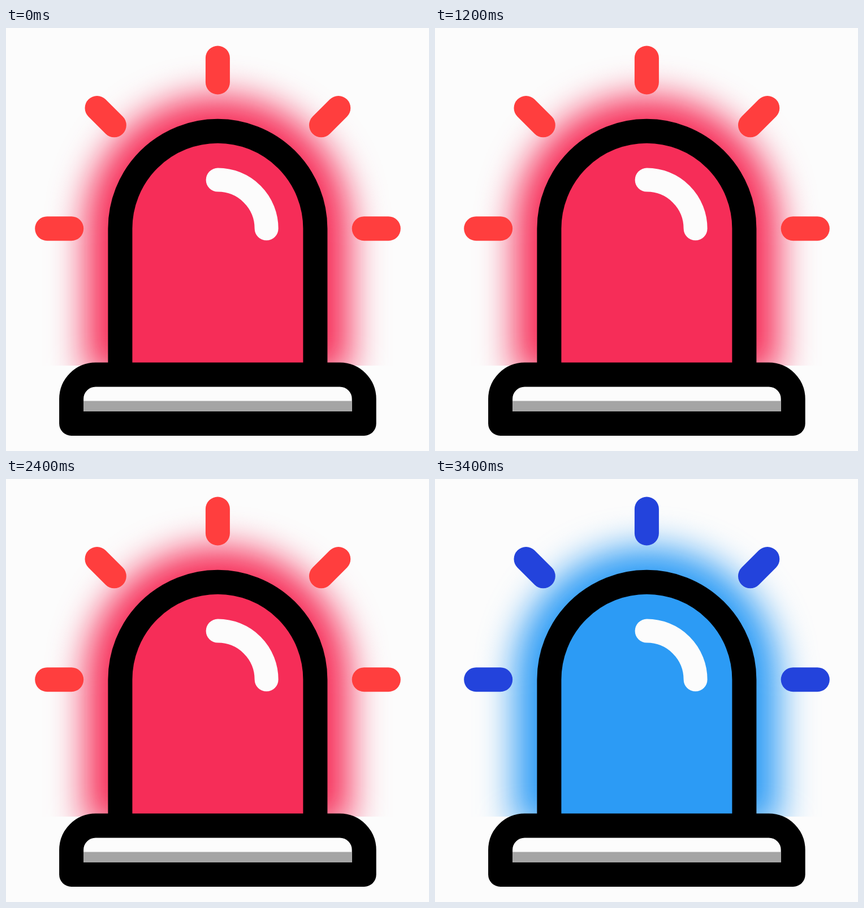
Animation, 748 px wide and 748 px high, one loop 3.6 s. Source, as an HTML page:

```html
<!DOCTYPE html>
<html lang="en">
<head>
<meta charset="utf-8">
<title>Siren</title>
<style>
  html, body { margin: 0; width: 100%; height: 100%; overflow: hidden; background: #fcfcfc; }
  svg { display: block; width: 100%; height: 100%; }
</style>
</head>
<body>
<svg viewBox="0 0 748 748" fill="none" stroke-width="43" stroke-linecap="round" stroke-linejoin="round">
  <defs>
    <filter id="blur" filterUnits="userSpaceOnUse" x="0" y="0" width="748" height="748" color-interpolation-filters="sRGB">
      <feGaussianBlur stdDeviation="32"/>
    </filter>
    <clipPath id="aboveBase"><path d="M0 0H748V597H0Z"/></clipPath>
  </defs>
  <g clip-path="url(#aboveBase)">
    <path id="glow" filter="url(#blur)" d="M141 613V354.7a233.4 233.4 0 0 1 466.8 0V613Z"/>
  </g>
  <path id="rays" d="M374.4 53V96M72.7 354.7H115.7M633.2 354.7H676.3M161 141.5l30.3 30.3M587.8 141.5l-30.3 30.3"/>
  <path id="dome" stroke="#000" d="M201.9 613V354.7a172.5 172.5 0 0 1 345 0V613"/>
  <path stroke="#fcfcfc" stroke-width="42" d="M374.6 268.6a86 86 0 0 1 86 86"/>
  <path stroke="#000" fill="#fcfcfc" d="M115.6 699.5V656a43 43 0 0 1 43-43H590.2a43 43 0 0 1 43 43V699.5Z"/>
  <path fill="#a5a5a5" d="M137 659.5H611.7V678H137Z"/>
</svg>
<script>
  const [glow, rays, dome] = ["glow", "rays", "dome"].map(id => document.getElementById(id));
  const lights = [
    { lamp: "#f62d58", ray: "#ff3e3e" },
    { lamp: "#2c9bf5", ray: "#2343dc" }
  ];

  // The lamp alternates every step; the rays skip every third one.
  function draw(time) {
    const step = Math.floor(time / 200);
    const { lamp, ray } = lights[step % 2];
    glow.setAttribute("fill", lamp);
    dome.setAttribute("fill", lamp);
    rays.setAttribute("stroke", step % 3 === 1 ? "none" : ray);
  }

  const start = performance.now();
  function tick() {
    draw(performance.now() - start);
    requestAnimationFrame(tick);
  }
  tick();
</script>
</body>
</html>
```
